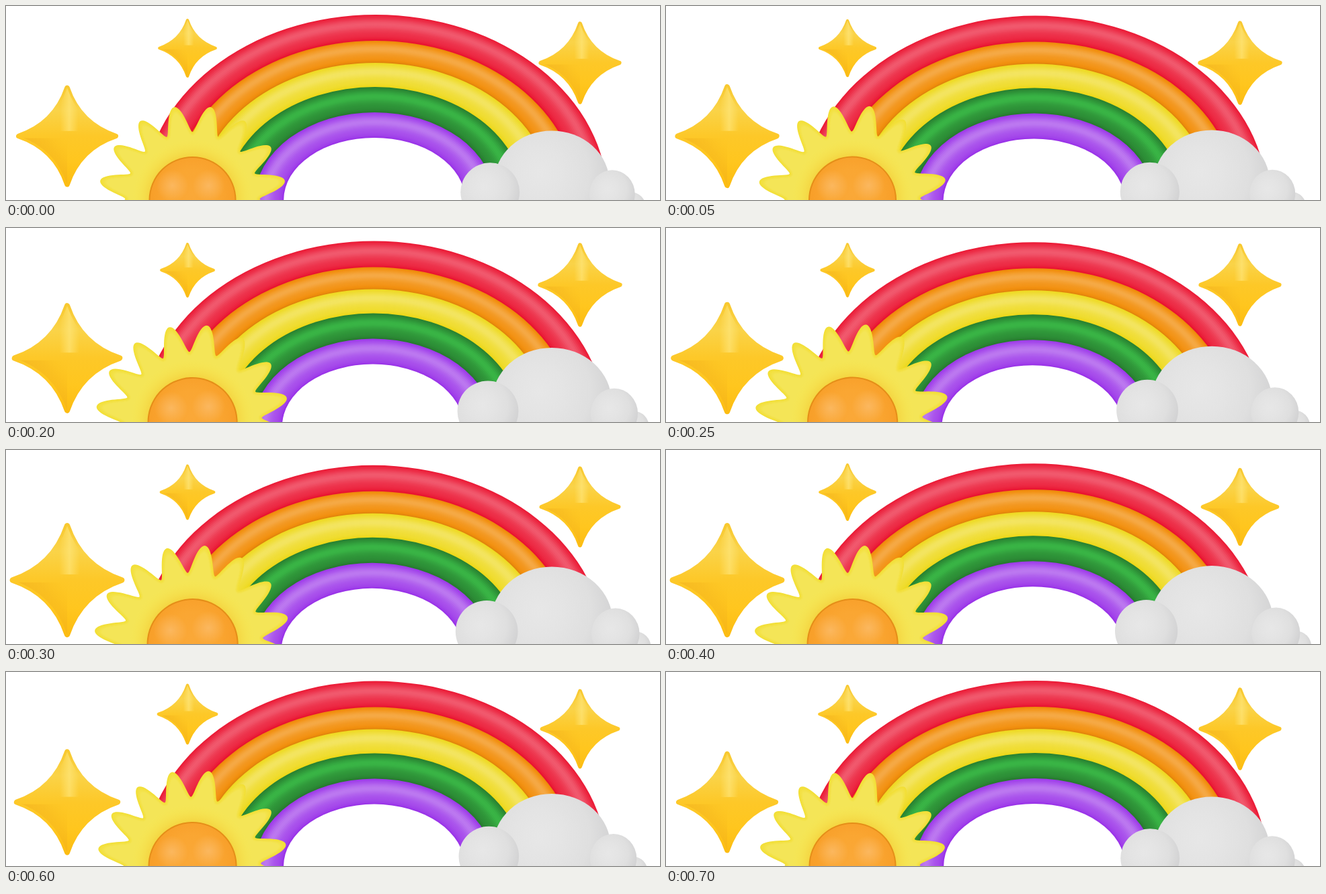
These frames come from a looping animation (973 px wide and 290 px high, 0.75 s). An HTML page with a canvas:

```html
<!DOCTYPE html>
<html lang="en">
<head>
<meta charset="utf-8">
<title>Rainbow</title>
<style>
  html, body { margin: 0; width: 100%; height: 100%; overflow: hidden; background: #fff; }
  canvas { display: block; }
</style>
</head>
<body>
<canvas id="stage" width="973" height="290"></canvas>
<script>
const ctx = document.getElementById('stage').getContext('2d');
const STEP = 50, STEPS = 15, SWING = 700;

// Triangle wave: `high` at the peak time, `low` half a swing later.
function swing(t, peak, low, high) {
  const phase = (t - peak) / SWING;
  return high + (low - high) * 2 * Math.abs(phase - Math.round(phase));
}

const lerp = (a, b, k) => a + (b - a) * k;

// Spreads the colors evenly over a gradient.
function spread(gradient, colors) {
  colors.forEach((color, i) => gradient.addColorStop(i / (colors.length - 1), color));
  return gradient;
}
const linear = (x0, y0, x1, y1, ...colors) =>
  spread(ctx.createLinearGradient(x0, y0, x1, y1), colors);
const radial = (x, y, r, ...colors) =>
  spread(ctx.createRadialGradient(x, y, 0, x, y, r), colors);

function ellipse(x, y, rx, ry, fill) {
  ctx.beginPath();
  ctx.ellipse(x, y, rx, ry, 0, 0, 2 * Math.PI);
  ctx.fillStyle = fill;
  ctx.fill();
}

function placed(x, y, scale, angle, draw) {
  ctx.save();
  ctx.translate(x, y);
  ctx.scale(scale, scale);
  ctx.rotate(angle);
  draw();
  ctx.restore();
}

const bandTops = [13, 52, 85, 121, 159, 197];
const bandColors = ['352 84%', '34 90%', '54 86%', '126 52%', '274 80%'];
const bandLights = [56, 53, 58, 38, 62];

function arch(top, fill) {
  const cy = 287 + top / 66, ry = cy - top;
  ellipse(550 - top / 100, cy, 27 + 1.16 * ry, ry, fill);
}

// Lightness across a tube: highlight in the upper third, darker rims.
const tubeLight = k =>
  9 * Math.exp(-(((k - 0.34) / 0.22) ** 2)) - 5 * (1 - k) ** 6 - 10 * k ** 8;

function rainbow(dy) {
  const slices = 18;
  placed(-0.35 * dy, dy, 1, 0, () => {
    bandColors.forEach((color, b) => {
      for (let s = 0; s < slices; s++) {
        const k = s / slices;
        arch(lerp(bandTops[b], bandTops[b + 1], k),
          `hsl(${color} ${bandLights[b] + tubeLight(k)}%)`);
      }
    });
    arch(bandTops[5], '#fff');
  });
}

function puff(x, y, rx, ry) {
  ellipse(x, y, rx, ry, radial(x - rx / 5, y - ry / 5, rx * 1.28,
    '#e7e7e7', '#e4e4e4', '#dfdfdf', '#d1d1d2'));
}

function cloud(scale) {
  placed(812, 405, scale, 0, () => {
    puff(118, -105, 22, 22);
    puff(0, -141, 86, 78);
    puff(90, -124, 34, 36);
    puff(-92, -127, 44, 44);
  });
}

function sparkle(x, y, size) {
  placed(x, y, size / 100, 0, () => {
    const tip = 95, waist = 24;
    ctx.beginPath();
    ctx.moveTo(0, -tip);
    ctx.quadraticCurveTo(waist, -waist, tip, 0);
    ctx.quadraticCurveTo(waist, waist, 0, tip);
    ctx.quadraticCurveTo(-waist, waist, -tip, 0);
    ctx.quadraticCurveTo(-waist, -waist, 0, -tip);
    ctx.closePath();
    ctx.fillStyle = ctx.strokeStyle =
      linear(0, -100, 0, 100, '#f8c82e', '#fad348', '#fdc828', '#ffc61e', '#fcbc12');
    ctx.lineWidth = 10;
    ctx.lineJoin = 'round';
    ctx.fill();
    ctx.stroke();
    ctx.clip();
    // Soft upper ridge and shaded lower left facet
    ctx.fillStyle = linear(-14, 0, 22, 0, '#ffe88000', '#ffe880a0', '#ffe88000');
    ctx.fillRect(-14, -100, 36, 90);
    ctx.fillStyle = linear(-60, 50, 0, 0, '#eda81c80', '#f4b41c60', '#ffc61c00');
    ctx.fillRect(-100, 4, 100, 96);
  });
}

function petals(valley, tip, sharpness, fill) {
  const rays = 16;
  ctx.beginPath();
  for (let a = 0; a < 2 * Math.PI; a += 0.013) {
    const r = lerp(valley, tip, ((1 - Math.cos(rays * a)) / 2) ** sharpness);
    ctx.lineTo(r * Math.cos(a), r * Math.sin(a));
  }
  ctx.fillStyle = fill;
  ctx.fill();
}

function sun(scale, angle) {
  placed(277.5, 288.5, scale, angle, () => {
    for (let k = 0; k < 6; k++) {
      petals(100 - k, 140 - 2 * k, 0.8 + k / 10, `hsl(54 88% ${58 + 1.4 * k}%)`);
    }
    ellipse(0, 0, 90, 90, radial(0, 0, 90, '#f2c42c', '#f2c42c', '#f4d03c', '#f8e85000'));
    ellipse(0, 1.5, 65, 65, '#e58e18');
    ellipse(0, 1.5, 63, 63, radial(0, -8, 74, '#faa838', '#faa632', '#f79b24'));
    for (const x of [-30, 24]) {
      ellipse(x, -20, 24, 24, radial(x, -20, 24, '#fcc68488', '#fcc68400'));
    }
  });
}

function frame(now) {
  const t = Math.floor(now / STEP) % STEPS * STEP;
  ctx.fillStyle = '#fff';
  ctx.fillRect(0, 0, 973, 290);
  rainbow(swing(t, 310, -1.4, 10.2));
  cloud(swing(t, 365, 0.995, 1.066));
  sparkle(91, 194.5, swing(t, 350, 76, 87));
  sparkle(270, 63, swing(t, 585, 40.4, 45.6));
  sparkle(854, 85, swing(t, 125, 56.6, 64.3));
  sun(swing(t, 350, 1, 1.055), swing(t, 350, 0, -0.08));
}

const start = performance.now();
function loop() {
  frame(performance.now() - start);
  requestAnimationFrame(loop);
}
loop();
</script>
</body>
</html>
```
